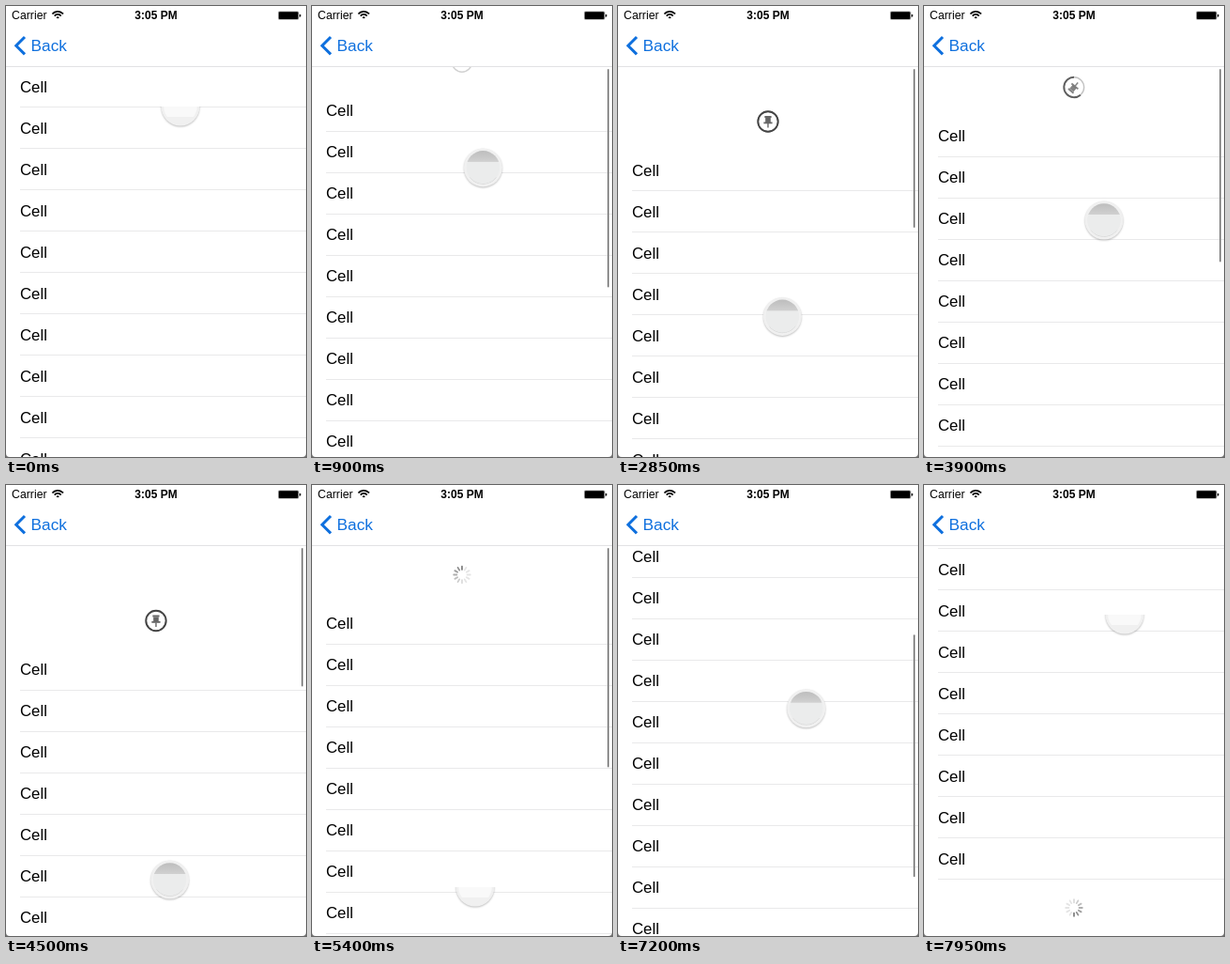
Recreate the animation shown at these times as an HTML page with a canvas. Size 320 by 480 pixels, loop 8 s.

```html
<!DOCTYPE html>
<html>
<head>
<meta charset="utf-8">
<style>
html, body { margin: 0; width: 100%; height: 100%; overflow: hidden; background: #fff; }
canvas { display: block; }
</style>
</head>
<body>
<canvas id="stage" width="320" height="480"></canvas>
<script>
const c = document.getElementById('stage').getContext('2d');
const LOOP = 8000, STEP = 150, TAU = Math.PI * 2;
const TOP = 64, ROW = 44, ROWS = 15, BLUE = '#0f70de';

// Key poses; power shapes the ease-out of the move that ends at the pose.
const pose = (time, offset, x, y, power = 1) => ({ time, offset, x, y, power });
const POSES = [
  pose(225, 0, 186, 107),
  pose(2700, 94, 173, 345),
  pose(3900, 52.5, 192, 228),
  pose(4650, 113, 174, 428, 2),
  pose(4950, 113, 174, 428),
  pose(5700, 60, 174, 428, 4),
  pose(6000, 60, 174, 428),
  pose(6450, 0, 180, 394),
  pose(6850, 0, 180, 394),
  pose(7600, -304, 214, 138, 1.5)
];

function poseAt(t) {
  const i = POSES.findIndex(p => p.time > t);
  if (i === 0) return POSES[0];
  if (i < 0) return POSES[POSES.length - 1];
  const a = POSES[i - 1], b = POSES[i];
  const u = 1 - (1 - (t - a.time) / (b.time - a.time)) ** b.power;
  const mix = key => a[key] + (b[key] - a[key]) * u;
  return { offset: Math.round(mix('offset') * 2) / 2, x: mix('x'), y: mix('y') };
}

function rect(x, y, w, h, color) {
  c.fillStyle = color;
  c.fillRect(x, y, w, h);
}

function pill(x, y, w, h, r, color) {
  c.fillStyle = color;
  c.beginPath();
  c.roundRect(x, y, w, h, r);
  c.fill();
}

function disc(r, color) {
  c.fillStyle = color;
  c.beginPath();
  c.arc(0, 0, r, 0, TAU);
  c.fill();
}

function arc(x, y, r, from, to, width, color) {
  c.beginPath();
  c.arc(x, y, r, from, to);
  c.lineWidth = width;
  c.strokeStyle = color;
  c.stroke();
}

function text(s, x, y, size, color = '#000', weight = 'normal', align = 'left') {
  c.font = `${weight} ${size}px "Liberation Sans", Arial, sans-serif`;
  c.fillStyle = color;
  c.textAlign = align;
  c.fillText(s, x, y);
}

function list(d) {
  for (let i = 0; i < ROWS; i++) {
    const y = TOP + d + i * ROW;
    text('Cell', 15, Math.floor(y) + 28, 16.8);
    rect(15, Math.ceil(y) + 43, 305, 1, '#e9e9ea');
  }
}

function pin(y, d) {
  const p = Math.max(0, Math.min(1, (d - 6) / 76)), up = -TAU / 4;
  c.save();
  c.translate(160, y);
  c.globalAlpha = 0.5 + 0.5 * p;
  arc(0, 0, 10.7, 0, TAU, 1.4, '#b5b5b5');
  arc(0, 0, 10.7, up - TAU * p, up, 1.9, '#444');
  c.rotate(TAU * (p - 1));
  rect(-3.6, -6, 7.2, 2, '#666');
  rect(-2.8, -4, 5.6, 5, '#666');
  rect(-4.6, 0.5, 9.2, 1.8, '#666');
  rect(-0.7, 2, 1.4, 4.5, '#666');
  c.restore();
}

function spinner(y, t) {
  const lead = Math.floor((t - 5400) * 12 / 1000 + 120.01);
  c.save();
  c.translate(160, y);
  for (let i = 0; i < 12; i++) {
    c.globalAlpha = Math.max(0.16, 0.75 - (lead - i) % 12 * 0.09);
    pill(-0.9, -9.7, 1.8, 5, 0.9, '#555');
    c.rotate(TAU / 12);
  }
  c.restore();
}

function scrollbar(d, t) {
  if (d === 0 || t >= 7800) return;
  const length = d < 0 ? 258 : (t < 5100 ? 258 : 295) - d;
  pill(315, 67 + Math.max(0, -d) * 151 / 304, 2, length, 1, '#909090');
}

function finger(x, y, t) {
  if (t >= 5700 && t < 6450) return;
  const pressed = t >= 450 && t < 4650 || t >= 6750 && t < 7650;
  c.save();
  c.translate(x, y);
  c.beginPath();
  c.rect(-25, pressed ? -25 : 0, 50, 50);
  c.clip();
  c.shadowColor = 'rgba(0,0,0,.25)';
  c.shadowBlur = 2;
  c.shadowOffsetY = 1;
  disc(20.5, '#f0f0f0');
  c.shadowColor = 'transparent';
  c.beginPath();
  c.arc(0, 0, 17.8, 0, TAU);
  c.clip();
  if (pressed) {
    const shade = c.createLinearGradient(0, -18, 0, -5);
    shade.addColorStop(0, '#bdbdbd');
    shade.addColorStop(1, '#d2d2d2');
    rect(-20, -20, 40, 40, '#ebecec');
    rect(-20, -20, 40, 14, shade);
    arc(0, 0, 17.7, 0.2 * Math.PI, 0.8 * Math.PI, 0.8, '#d0d0d0');
  } else {
    rect(-20, 0, 40, 11, '#f9f9f9');
  }
  c.restore();
}

function header() {
  rect(0, 0, 320, TOP, '#fff');
  rect(0, TOP, 320, 1, '#e2e2e4');
  text('Carrier', 6, 14, 12.3);
  text('3:05 PM', 160, 14, 12, '#000', 'bold', 'center');
  for (const r of [1.3, 4.6, 7.7]) arc(55.2, 13.6, r, -0.77 * Math.PI, -0.23 * Math.PI, 1.8, '#000');
  pill(290, 5.5, 22.6, 9.2, 1.6, '#aaa');
  pill(291, 6.3, 20.6, 7.6, 1, '#000');
  pill(313, 8.7, 1.4, 3, 0.7, '#000');
  c.beginPath();
  c.moveTo(20, 33);
  c.lineTo(10.8, 42.2);
  c.lineTo(20, 51.4);
  c.lineWidth = 3;
  c.strokeStyle = BLUE;
  c.stroke();
  text('Back', 26.5, 48, 17.3, BLUE);
}

function corners() {
  c.fillStyle = '#777';
  for (const [x, side] of [[0, 1], [320, -1]]) {
    c.beginPath();
    c.moveTo(x, 476);
    c.quadraticCurveTo(x, 480, x + 4 * side, 480);
    c.lineTo(x, 480);
    c.fill();
  }
}

function draw(now) {
  const t = Math.floor((now % LOOP) / STEP) * STEP;
  const { offset: d, x, y } = poseAt(t);
  rect(0, 0, 320, 480, '#fff');
  list(d);
  if (d > 0) (t < 5100 ? pin(34 + d, d) : spinner(34 + d, t));
  if (d < -200) spinner(TOP + d + ROWS * ROW + 30, t);
  scrollbar(d, t);
  header();
  finger(x, y, t);
  corners();
}

const start = performance.now();
function tick() {
  draw(performance.now() - start);
  requestAnimationFrame(tick);
}
tick();
</script>
</body>
</html>
```
